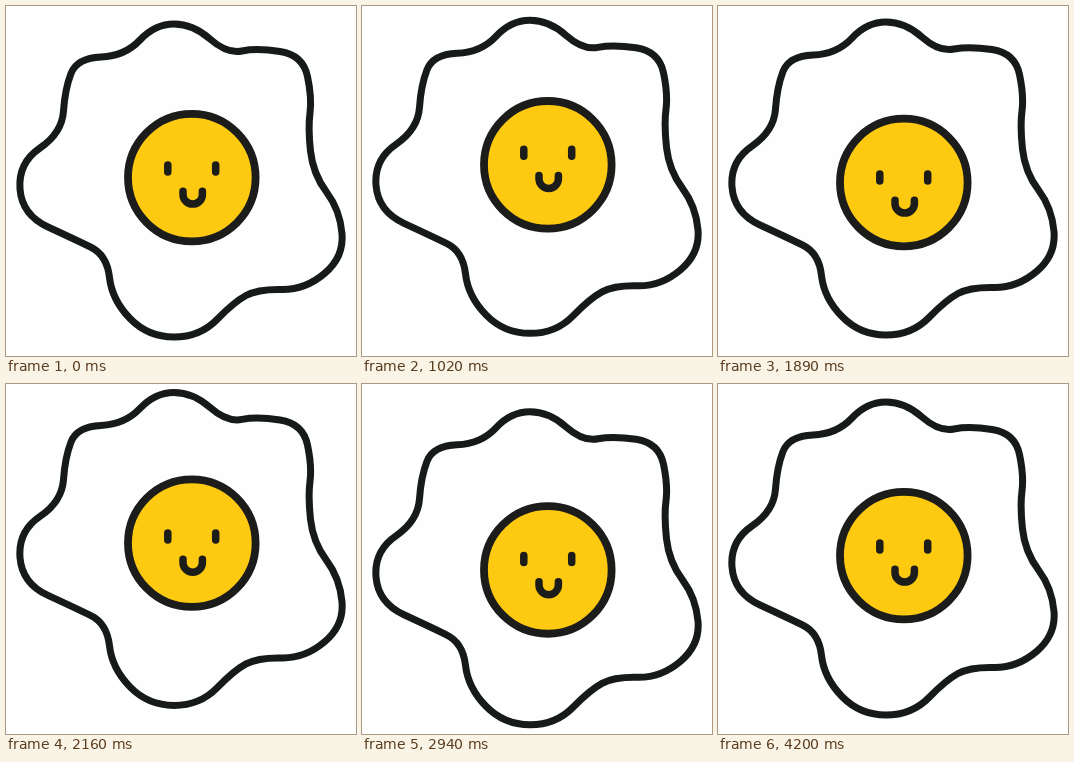
An HTML page for the animation above (4.5 s loop, 350x350 px).

```html
<!DOCTYPE html>
<html lang="en">
<head>
<meta charset="utf-8">
<title>Bouncing egg</title>
<style>
  html, body { margin: 0; width: 100%; height: 100%; overflow: hidden; background: #fff; }
  svg { display: block; width: 100vw; height: 100vh; }
</style>
</head>
<body>
<svg viewBox="0 0 350 350" fill="none" stroke="#1c1c1a" stroke-linecap="round" stroke-linejoin="round">
  <path id="white" fill="#fefefe" stroke="#161b18" stroke-width="7"/>
  <circle id="yolk" cx="185.8" cy="171.6" r="63.8" fill="#fdc911" stroke-width="7.8"/>
  <g id="face" stroke-width="7.5">
    <path d="M161.8 159v7M209.7 159v7"/>
    <path d="M177 185.2v3.2a9.7 9.7 0 0 0 19.4 0v-3.2"/>
  </g>
</svg>
<script>
const LOOP = 4500, STEP = 30, SWING = 733, SWINGS = 4;

// Each layer starts a little after the one beneath it
const layers = [
  { id: "white", delay: 10, height: 9.8, settle: 935 },
  { id: "yolk", delay: 128, height: 16.5, settle: 900 },
  { id: "face", delay: 185, height: 17.3, settle: 1050 }
].map(layer => ({ ...layer, node: document.getElementById(layer.id) }));

// Corners of the egg white, clockwise from the top, before rounding
const corners = "149,18 187,18 221,48 251,42 297,49 306,92 302,122 307,168 334,204 338,251 299,284 252,283 "
  + "228,296 194,331 142,331 106,294 101,249 68,233 16,209 12,157 56,127 59,83 71,52 119,50";

// Quadratic curves between the edge midpoints round every corner
function roundedPath(text) {
  const points = text.split(" ").map(pair => pair.split(",").map(Number));
  const arcs = points.map((p, i) => {
    const next = points[(i + 1) % points.length];
    return `${p} ${p.map((v, k) => (v + next[k]) / 2)}`;
  });
  const start = arcs[arcs.length - 1].split(" ")[1];
  return `M${start}Q${arcs.join(" ")}Z`;
}

const ease = u => (1 - Math.cos(Math.PI * Math.min(Math.max(u, 0), 1))) / 2;

// Rise from rest, swing between the extremes, then settle back to rest
function offsetAt(t, { delay, height, settle }) {
  const swing = (t - delay) / SWING;
  if (swing < 1) return -height * ease(swing);
  if (swing < SWINGS) return height * Math.cos(Math.PI * swing);
  return height * (1 - ease((swing - SWINGS) * SWING / settle));
}

function draw(now) {
  const t = Math.floor((now % LOOP) / STEP) * STEP;
  for (const layer of layers) {
    layer.node.setAttribute("transform", `translate(0 ${offsetAt(t, layer).toFixed(2)})`);
  }
}

layers[0].node.setAttribute("d", roundedPath(corners));
const start = performance.now();
function tick() {
  draw(performance.now() - start);
  requestAnimationFrame(tick);
}
tick();
</script>
</body>
</html>
```
